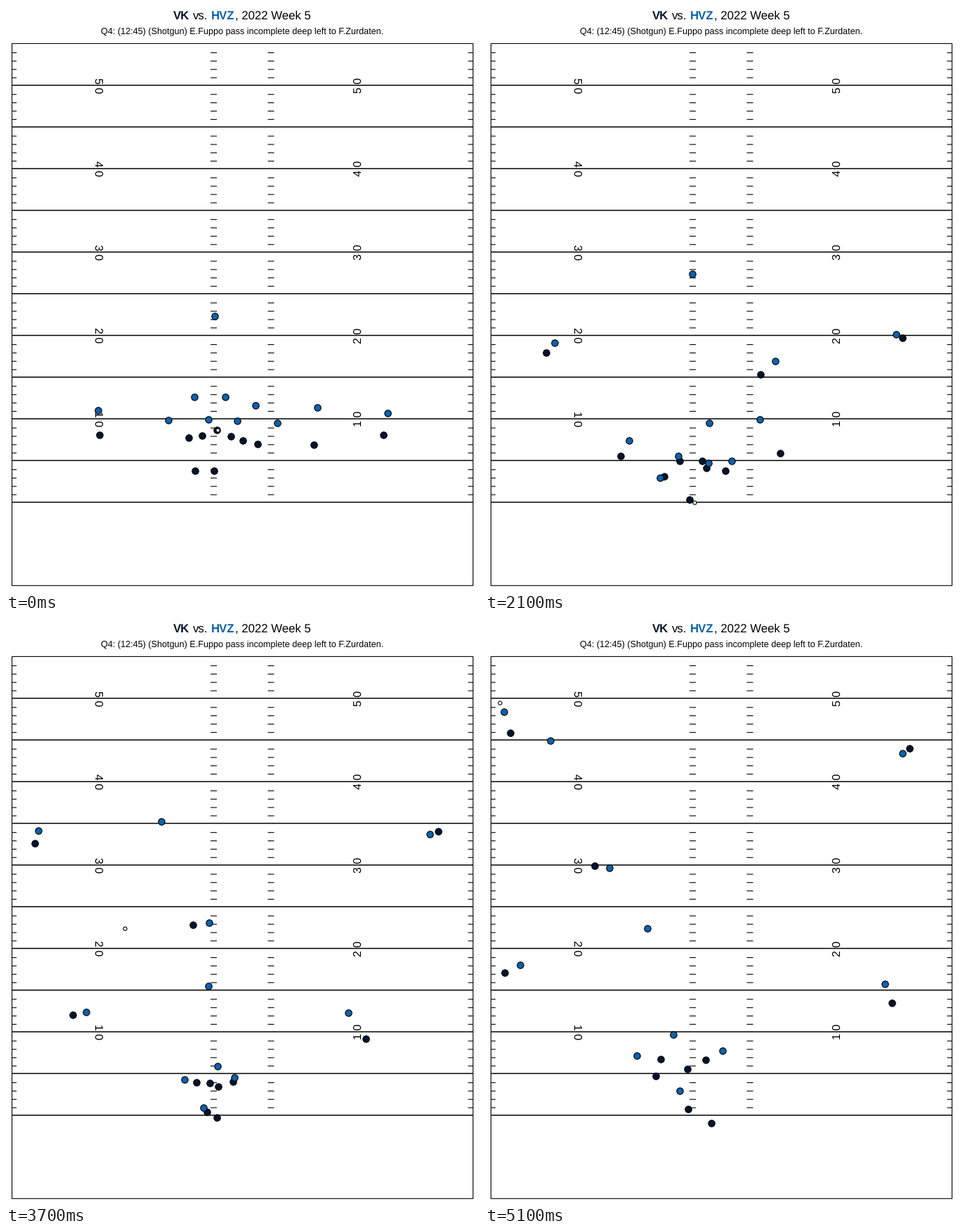
Animation, 673 px wide and 832 px high, one loop 6 s. Source, as a matplotlib script:

```python
import numpy as np
import matplotlib.pyplot as plt
from matplotlib.animation import FuncAnimation

W, H, DPI = 673, 832, 64
PX = 72 / DPI                     # points per pixel
NAVY, BLUE = "#04142f", "#0b62ad"
LEFT, RIGHT, GOAL, YARD = 8.5, 664.5, 705.7, 11.86
FRAMES, STEP, LAST = 60, 100, 51

plt.rcParams.update({"font.family": "Liberation Sans",
                     "text.hinting": "none", "path.snap": False})

# Seconds of the main events
SNAP, CATCH, THROW, TIP, END = 0.2, 0.8, 2.6, 4.9, 5.1
ROUTE_TIMES = (SNAP, 1.5, 3.1, END)
GAP_TIMES = (SNAP, 2.4, END)


def ease(u):
    return u * u * (3 - 2 * u)


def smooth(times, *points):
    """Cubic path through the points, starting from rest."""
    t, p = np.array(times), np.array(points, float)
    v = np.gradient(p, t, axis=0)
    v[0] = 0

    def at(now):
        now = max(now, t[0])
        k = min(np.searchsorted(t, now, side="right") - 1, len(t) - 2)
        h = t[k + 1] - t[k]
        u = (now - t[k]) / h
        bend = (1 - u) * v[k] - u * v[k + 1]
        return (p[k] + (p[k + 1] - p[k]) * ease(u)) + h * u * (1 - u) * bend
    return at


def route(*points):
    return smooth(ROUTE_TIMES, *points)


def shadow(man, *gaps):
    """Follow another player while the gap closes and opens again."""
    gap = smooth(GAP_TIMES, *gaps)
    return lambda now: man(now) + gap(now)


# Blockers fall back into a pocket
tackle_l = route((260, 614), (245, 650), (281, 696), (289, 697))
guard_l = route((279, 611), (276, 633), (277, 664), (250, 626))
center = route((300, 603), (308, 635), (304, 660), (243, 650))
guard_r = route((320, 612), (318, 645), (307, 669), (288, 640))
tackle_r = route((337, 618), (347, 652), (328, 665), (314, 627))

passer = route((296, 661), (292, 696), (294, 706), (322, 717))
back = route((269, 661), (228, 661), (127, 589), (28, 503))
wide_l = route((133, 610), (108, 547), (50, 384), (36, 162))
wide_r = route((537, 610), (578, 533), (613, 358), (604, 184))
slot = route((438, 624), (427, 556), (312, 470), (156, 351))
tight = route((358, 623), (389, 640), (481, 615), (579, 546))

offense = [tackle_l, guard_l, center, guard_r, tackle_r, passer, back,
           wide_l, wide_r, slot, tight]
defense = [
    shadow(tackle_l, (-29, -25), (-4, 4), (-12, -26)),
    shadow(guard_l, (9, -23), (-4, -5), (-34, -5)),
    shadow(guard_r, (9, -22), (5, -6), (50, -26)),
    shadow(tackle_r, (49, -25), (2, -14), (-46, -36)),
    shadow(wide_l, (-2, -35), (13, -13), (-9, -30)),
    shadow(wide_r, (6, -31), (-11, -2), (-10, 7)),
    shadow(slot, (5, -53), (22, -14), (21, 3)),
    shadow(back, (-1, -105), (14, -12), (22, -11)),
    shadow(tight, (-3, -55), (-31, -46), (-10, -27)),
    route((312, 556), (321, 602), (306, 551), (231, 440)),
    route((297, 441), (303, 405), (262, 330), (93, 173)),
]

HOLD = np.array([6.5, 3.5])
SPOT, TIPPED, DOWN = map(np.array, ((300.5, 603), (28.5, 147.5), (21, 119)))


def ball_at(now):
    held = passer(min(now, THROW)) + HOLD
    if now < CATCH:
        return SPOT + (held - SPOT) * ease(max(now - SNAP, 0) / (CATCH - SNAP))
    if now < THROW:
        return held
    if now < TIP:
        return held + (TIPPED - held) * (now - THROW) / (TIP - THROW)
    return TIPPED + (DOWN - TIPPED) * (now - TIP) / (END - TIP)


fig = plt.figure(figsize=(W / DPI, H / DPI), dpi=DPI, facecolor="white")
ax = fig.add_axes([0, 0, 1, 1])
ax.set(xlim=(0, W), ylim=(H, 0))
ax.axis("off")


def label(x, y, text, size, **kw):
    kw = {"va": "baseline", "color": "black", **kw}
    ax.text(x, y, text, fontsize=size * PX, **kw)


def line(xs, ys, width):
    ax.plot(xs, ys, color="black", lw=width * PX, solid_capstyle="butt")


def field():
    top, bottom = GOAL - 55 * YARD, GOAL + 10 * YARD
    line([LEFT, RIGHT, RIGHT, LEFT, LEFT], [top, top, bottom, bottom, top], 1.1)
    for yard in range(55):
        y = GOAL - yard * YARD
        if yard % 5 == 0:
            line([LEFT, RIGHT], [y, y], 1.5)
            continue
        for x0, x1 in ((LEFT, 15), (291, 300), (372.5, 381.5), (657.5, RIGHT)):
            line([x0, x1], [y + 1.2, y + 1.2], 1.1)
    for yard in range(10, 60, 10):
        for x, turn in ((130, -90), (502, 90)):
            label(x, GOAL - yard * YARD, f"{yard // 10} 0", 16, rotation=turn,
                  ha="center", va="center")


def heading():
    label(238, 19, "VK", 16.8, color=NAVY, weight="bold")
    label(266, 19, "vs.", 16.8)
    label(292, 19, "HVZ", 16.8, color=BLUE, weight="bold")
    label(326, 19, ", 2022 Week 5", 16.8)
    label(336.5, 40.7, "Q4: (12:45) (Shotgun) E.Fuppo pass incomplete "
          "deep left to F.Zurdaten.", 12.6, ha="center")


def dots(color, size):
    return ax.plot([], [], "o", ms=size * PX, mfc=color, mec="black",
                   mew=1.1 * PX, zorder=5)[0]


field()
heading()
teams = [(dots(NAVY, 9.4), offense), (dots(BLUE, 9.4), defense),
         (dots("white", 5.2), [ball_at])]


def draw(i):
    now = min(i, LAST) * STEP / 1000
    for marks, paths in teams:
        marks.set_data(*np.transpose([path(now) for path in paths]))
    return [marks for marks, _ in teams]


anim = FuncAnimation(fig, draw, frames=FRAMES, interval=STEP, repeat=True,
                     repeat_delay=0)
plt.show()
```
